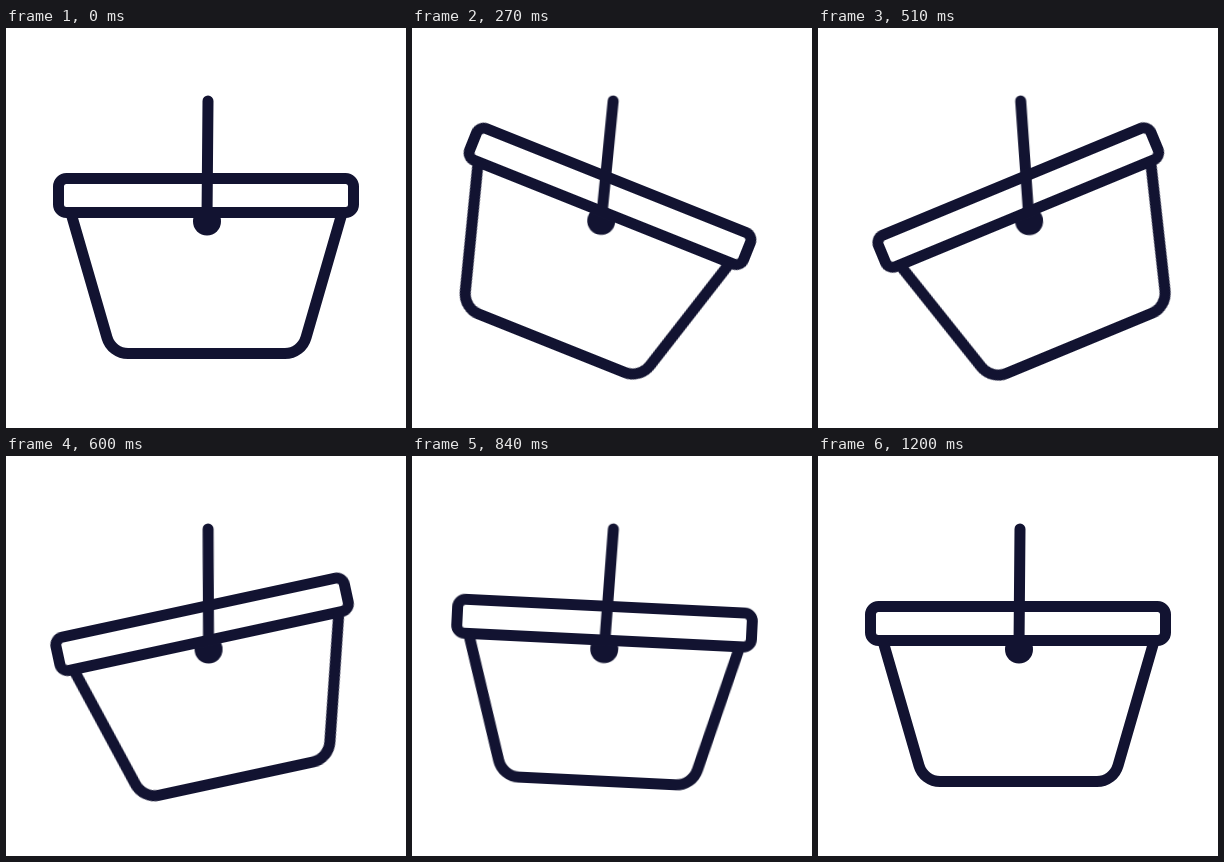
Animation of 400 by 400 pixels, one loop 1.26 s. Source, as an HTML page:

```html
<!DOCTYPE html>
<html lang="en">
<head>
<meta charset="utf-8">
<title>Swinging basket</title>
<style>
  html, body {
    margin: 0;
    width: 100%;
    height: 100%;
    overflow: hidden;
    background: #fff;
  }
  svg {
    display: block;
    width: 100%;
    height: 100%;
    fill: none;
    stroke: #121331;
    stroke-width: 11;
    stroke-linecap: round;
  }
  .knob {
    fill: #121331;
    stroke: none;
  }
  .handle, .basket {
    animation: 1260ms cubic-bezier(.333, 0, .667, 1) infinite;
  }
  .handle {
    transform-origin: 202px 64px;
    animation-name: swing;
  }
  .basket {
    transform-origin: 201px 193.5px;
    animation-name: tilt;
  }
  @keyframes swing {
    0%, 95.24%, 100% { transform: rotate(0deg); }
    19.44% { transform: rotate(5.5deg); }
    39.29% { transform: rotate(-4.6deg); }
    59.52% { transform: rotate(5.8deg); }
    79.37% { transform: rotate(-.6deg); }
  }
  /* Relative to the handle */
  @keyframes tilt {
    0%, 95.24%, 100% { transform: rotate(0deg); }
    19.44% { transform: rotate(17.7deg); }
    39.29% { transform: rotate(-18.2deg); }
    59.52% { transform: rotate(-.3deg); }
    79.37% { transform: rotate(-2.8deg); }
  }
</style>
</head>
<body>
<svg viewBox="0 0 400 400">
  <g class="handle">
    <path d="M202 73 L201 190"/>
    <circle class="knob" cx="201" cy="193.5" r="14"/>
    <g class="basket">
      <rect x="52.5" y="150.5" width="295" height="34" rx="8"/>
      <path d="M65.5 187 L101 309.6 A22 22 0 0 0 122.1 325.5 H278.9 A22 22 0 0 0 300 309.6 L335.5 187"/>
    </g>
  </g>
</svg>
</body>
</html>
```
